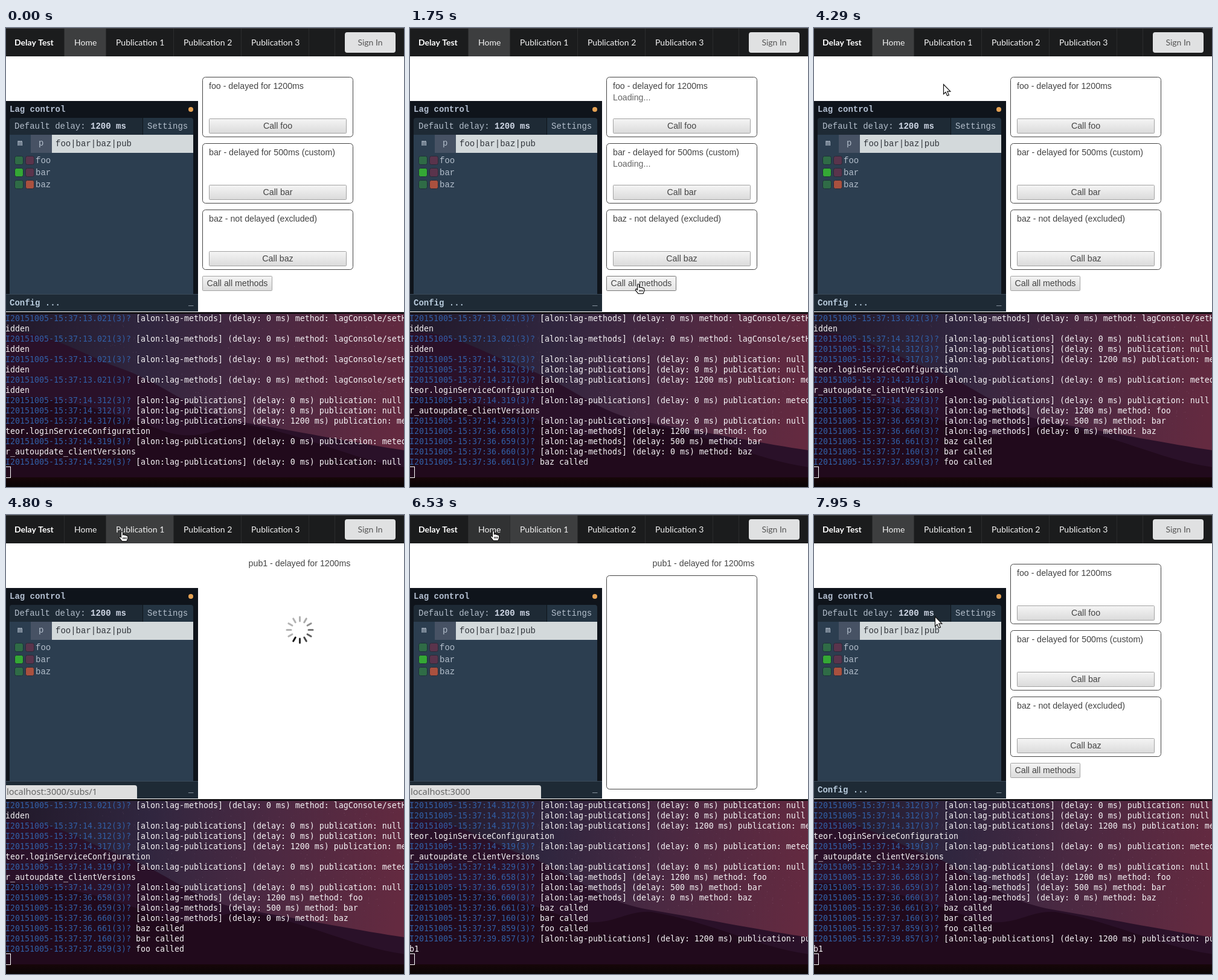
These frames come from a looping animation (659x761 px, 7.99 s). An HTML page with a canvas:

```html
<!DOCTYPE html>
<html lang="en">
<head>
<meta charset="utf-8">
<title>Delay Test</title>
<style>
html, body { margin: 0; width: 100%; height: 100%; overflow: hidden; background: #fff; }
canvas { display: block; }
</style>
</head>
<body>
<canvas id="stage" width="659" height="761"></canvas>
<script>
const ctx = document.getElementById('stage').getContext('2d');
const LOOP = 7990;
const SANS = '14.2px "Liberation Sans", Arial, sans-serif';
const MONO = '14px "Liberation Mono", monospace';
const LATO = '14px Lato, sans-serif';
const TERM = '13.29px "DejaVu Sans Mono", monospace';

function rect(x, y, w, h, fill) {
  ctx.fillStyle = fill;
  ctx.fillRect(x, y, w, h);
}
function round(x, y, w, h, r, fill, stroke) {
  ctx.beginPath();
  ctx.roundRect(x, y, w, h, r);
  if (fill) { ctx.fillStyle = fill; ctx.fill(); }
  if (stroke) { ctx.strokeStyle = stroke; ctx.lineWidth = 1; ctx.stroke(); }
}
function text(str, x, y, font, fill, align = 'left') {
  ctx.font = font;
  ctx.fillStyle = fill;
  ctx.textAlign = align;
  ctx.fillText(str, x, y);
}
function fade(y0, y1, ...colors) {
  const g = ctx.createLinearGradient(0, y0, 0, y1);
  colors.forEach((c, i) => g.addColorStop(i / (colors.length - 1), c));
  return g;
}

// Terminal rows; "time|message" carries a timestamp, other rows are wrapped text.
const method = (time, ms, name) => `${time}|[alon:lag-methods] (delay: ${ms} ms) method: ${name}`;
const pub = (time, ms, name) => `${time}|[alon:lag-publications] (delay: ${ms} ms) publication: ${name}`;
const rows = [];
for (let i = 0; i < 4; i++) rows.push(method('13.021', 0, 'lagConsole/setH'), 'idden');
rows.push(
  pub('14.312', 0, 'null'), pub('14.312', 0, 'null'),
  pub('14.317', 1200, 'me'), 'teor.loginServiceConfiguration',
  pub('14.319', 0, 'meteo'), 'r_autoupdate_clientVersions',
  pub('14.329', 0, 'null'),
  method('36.658', 1200, 'foo'), method('36.659', 500, 'bar'), method('36.660', 0, 'baz'),
  '36.661|baz called', '37.160|bar called', '37.859|foo called',
  pub('39.857', 1200, 'pu'), 'b1');

function hill(fill, x, y, ...curves) {
  ctx.beginPath();
  ctx.moveTo(x, y);
  for (const c of curves) ctx.bezierCurveTo(...c);
  ctx.lineTo(659, 761);
  ctx.lineTo(0, 761);
  ctx.fillStyle = fill;
  ctx.fill();
}
function wallpaper() {
  const sky = ctx.createLinearGradient(0, 500, 659, 600);
  sky.addColorStop(0, '#21192a');
  sky.addColorStop(.35, '#30263f');
  sky.addColorStop(.65, '#4b2942');
  sky.addColorStop(1, '#642a40');
  rect(0, 471, 659, 290, sky);
  let seed = 7;
  const rnd = () => (seed = seed * 16807 % 2147483647) / 2147483647;
  for (let i = 0; i < 420; i++) {
    rect(150 + 509 * rnd(), 474 + 190 * rnd(), 1, 1, `rgba(210,170,200,${.05 + .2 * rnd()})`);
  }
  hill('#2a1129', 0, 505, [70, 500, 130, 545, 200, 568], [280, 600, 310, 640, 400, 655], [500, 672, 590, 690, 659, 700]);
  hill('#210a1c', 0, 610, [90, 610, 190, 640, 260, 668], [330, 690, 350, 655, 400, 658], [500, 675, 570, 715, 659, 728]);
  rect(0, 745, 659, 16, fade(745, 761, '#170608', '#090506'));
  rect(0, 471, 659, 3, '#131114');
}
function terminal(t) {
  const count = t < 1710 ? 15 : t < 2260 ? 19 : t < 2900 ? 20 : t < 4880 ? 21 : 23;
  wallpaper();
  rows.slice(count - 15, count).forEach((row, i) => {
    const [time, msg] = row.split('|');
    const y = 486 + 17 * i;
    if (!msg) return text(row, -1, y, TERM, '#f4f2f4');
    text(`I20151005-15:37:${time}(3)?`, -1, y, TERM, '#315fa6');
    text(msg, 215, y, TERM, '#f4f2f4');
  });
  ctx.strokeStyle = '#fff';
  ctx.lineWidth = 1;
  ctx.strokeRect(-.5, 727.5, 8, 18);
}

const tabs = [['Home', 97], ['Publication 1', 166], ['Publication 2', 278], ['Publication 3', 390], ['', 502], ['', 545]];
function nav(active, hover) {
  rect(0, 0, 659, 47, '#1b1c1d');
  rect(0, 0, 659, 1, '#4a4a4b');
  text('Delay Test', 14, 29, 'bold ' + LATO, '#fff');
  tabs.forEach(([name, x], i) => {
    const end = i < 5 ? tabs[i + 1][1] : 659;
    if (i === active) rect(x, 1, end - x, 46, '#3d3e3f');
    else if (i === hover) rect(x, 1, end - x, 46, '#313233');
    rect(x - 1, 1, 1, 46, '#2b2c2d');
    text(name, x + 16, 29, LATO, '#f4f4f4');
  });
  round(561, 7, 84, 34, 4, '#e0e1e2');
  text('Sign In', 603, 29, LATO, '#555', 'center');
}

function button(label, x, y, w, hot) {
  round(x + .5, y + .5, w - 1, 24, 1, fade(y, y + 25, '#f5f5f5', hot ? '#e4e4e4' : '#dadada'), hot ? '#777' : '#a2a2a2');
  text(label, x + w / 2, y + 17, SANS, '#444', 'center');
}
function methods(t, hot) {
  const boxes = [
    ['foo', 'delayed for 1200ms', 2900],
    ['bar', 'delayed for 500ms (custom)', 2220],
    ['baz', 'not delayed (excluded)', 0]];
  boxes.forEach(([name, note, done], i) => {
    const y = 81 + 110 * i;
    round(325.5, y + .5, 249, 99, 5, '#fff', '#444');
    text(`${name} - ${note}`, 336, y + 20, SANS, '#444');
    if (t >= 1670 && t < done) text('Loading...', 336, y + 39, SANS, '#666');
    button('Call ' + name, 336, y + 69, 228);
  });
  button('Call all methods', 325, 411, 116, hot);
}

function publication(t) {
  text('pub1 - delayed for 1200ms', 486, 85, SANS, '#444', 'center');
  if (t >= 5870) return round(325.5, 100.5, 249, 354, 5, null, '#444');
  const head = 5 + (t - 5830) * .012;
  for (let i = 0; i < 12; i++) {
    const lag = (((head - i) % 12) + 12) % 12;
    ctx.save();
    ctx.translate(486.5, 190.5);
    ctx.rotate(i * Math.PI / 6);
    round(13, -1.5, 10, 3, 1.5, `rgba(0,0,0,${Math.max(.3, 1 - lag * .1)})`);
    ctx.restore();
  }
}

function panel() {
  const pale = '#b4bfcc';
  rect(0, 121, 318, 349, '#0f141b');
  text('Lag control', 6, 139, 'bold ' + MONO, '#b4c0d2');
  round(302, 131, 8, 8, 4, '#e5a254');
  round(6, 149, 220, 28, [4, 0, 0, 0], '#1e2a35');
  round(227, 149, 83, 28, [0, 4, 0, 0], '#243442');
  text('Default delay:', 14, 167, MONO, pale);
  text('1200 ms', 140, 167, 'bold ' + MONO, '#d0d8e6');
  text('Settings', 234, 167, MONO, pale);
  rect(6, 177, 304, 264, '#2c3e50');
  rect(41, 177, 35, 30, '#475264');
  rect(76, 177, 234, 30, '#d3d9db');
  text('m', 19, 195, 'bold ' + MONO, pale);
  text('p', 54, 195, MONO, pale);
  text('foo|bar|baz|pub', 82, 196, MONO, '#30343a');
  ['foo', 'bar', 'baz'].forEach((name, i) => {
    const y = 212.5 + 20 * i;
    round(14.5, y, 14, 14, 3, i === 1 ? '#34a835' : '#2f6b46', '#1d3038');
    round(32.5, y, 14, 14, 3, i === 2 ? '#a9513f' : '#5a344c', '#2a2a38');
    text(name, 49, y + 11.5, MONO, pale);
  });
  rect(0, 441, 318, 29, '#1e2a35');
  rect(0, 441, 318, 1, '#3a4957');
  text('Config ...', 6, 460, 'bold ' + MONO, '#b8cbdc');
  text('_', 302, 459, MONO, pale);
}

function status(t) {
  const alpha = Math.min((t - 4540) / 120, (7380 - t) / 120, 1);
  if (alpha <= 0) return;
  ctx.globalAlpha = alpha;
  round(-1, 448, 218, 22, [0, 4, 0, 0], '#dedede');
  const path = t < 6400 ? '/subs/1' : '';
  text('localhost:3000' + path, 1, 464, '14.6px "Noto Sans", "Open Sans", sans-serif', '#666');
  ctx.globalAlpha = 1;
}

// Pointer tip: time, x, y
const track = [
  [670, 12, 641], [900, 180, 545], [1160, 373, 432], [1489, 373, 432], [1490, 378, 425],
  [2220, 378, 425], [2300, 376, 443], [3569, 376, 443], [3570, 376, 444], [3770, 376, 440],
  [4000, 325, 290], [4290, 214, 93], [4490, 192, 28], [6190, 192, 28], [6610, 125, 27],
  [6800, 126, 28], [6950, 142, 79], [7250, 110, 170], [7510, 62, 240], [7600, 56, 246],
  [7750, 110, 220], [7950, 200, 168], [LOOP, 200, 168]];
function pointer(t) {
  const i = track.findIndex(k => k[0] > t);
  const [t0, x0, y0] = track[i - 1], [t1, x1, y1] = track[i];
  const f = (t - t0) / (t1 - t0);
  return [x0 + (x1 - x0) * f, y0 + (y1 - y0) * f];
}
const arrow = new Path2D('M.5 .5V16.5L4 13.2L6.6 19.3L9.4 18.1L6.8 12.2H11.8Z');
const hand = new Path2D('M-1.5 9V1Q-1.5 -.5 0 -.5Q1.5 -.5 1.5 1V5Q3 3.8 4.5 5.4Q6 4.6 7.3 6.2Q9.8 5.8 9.8 8V11L8 15.5H0L-4.5 10Q-5 7.6 -3 7.6Z');
const creases = new Path2D('M2 9V12M4.4 9V12M6.8 9V12');
function drawPointer(x, y, link) {
  ctx.save();
  ctx.translate(Math.round(x), Math.round(y));
  ctx.fillStyle = '#fff';
  ctx.strokeStyle = '#111';
  ctx.lineWidth = 1.2;
  ctx.fill(link ? hand : arrow);
  ctx.stroke(link ? hand : arrow);
  if (link) ctx.stroke(creases);
  ctx.restore();
}

function draw(t) {
  const shown = t >= 670;
  const [x, y] = shown ? pointer(t) : [-99, -99];
  const onPub = t >= 4800 && t < 6750;
  const hot = !onPub && x >= 325 && x < 441 && y >= 411 && y < 436;
  const hover = y >= 0 && y < 47 ? tabs.findIndex(([, left], i) => i < 4 && x >= left && x < tabs[i + 1][1]) : -1;
  rect(0, 0, 659, 761, '#fff');
  nav(onPub ? 1 : 0, hover);
  if (onPub) publication(t);
  else methods(t, hot);
  panel();
  status(t);
  terminal(t);
  if (shown) drawPointer(x, y, hot || hover >= 0);
}
const start = performance.now();
function tick() {
  draw((performance.now() - start) % LOOP);
  requestAnimationFrame(tick);
}
tick();
</script>
</body>
</html>
```
